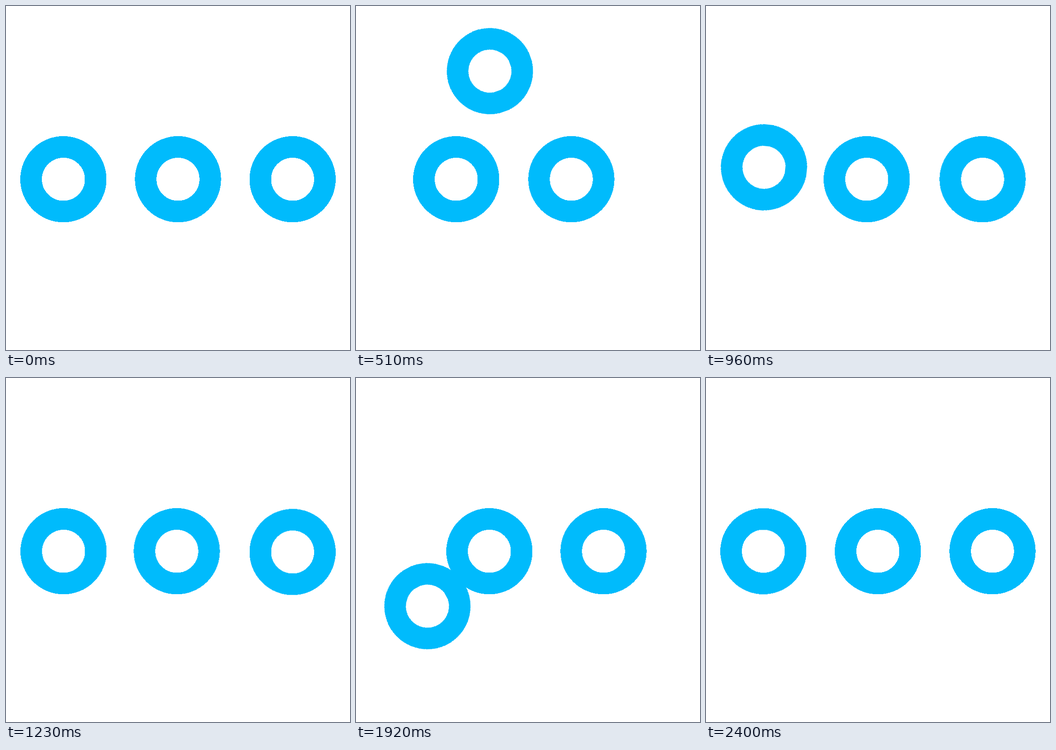
Recreate the animation shown at these times as an HTML page without scripts. Size 748x748 px, loop 2430 ms.

```html
<!DOCTYPE html>
<html lang="en">
<head>
<meta charset="utf-8">
<title>Rolling rings</title>
<style>
  html, body {
    margin: 0;
    width: 100%;
    height: 100%;
    overflow: hidden;
    background: #fff;
  }
  svg {
    display: block;
    width: 748px;
    height: 748px;
  }
  circle {
    fill: none;
    stroke: #00bbfc;
    stroke-width: 47;
    shape-rendering: crispEdges;
    animation: 2430ms infinite;
  }

  /* Two rings slide one place right while the third swings back to the left. */
  .first  { animation-name: slide-first; }
  .second { animation-name: slide-second; }
  .first, .second { animation-timing-function: cubic-bezier(.397, 0, .603, 1); }
  .orbit {
    transform-origin: 374px 376.7px;
    animation-name: swing;
    animation-timing-function: cubic-bezier(.328, 0, .322, 1);
  }

  /* Each pass takes 1200 ms; the roles swap between passes, then a 30 ms rest. */
  @keyframes slide-first {
    0%, 49.3826% { transform: translateX(0); }
    49.382% { transform: translateX(246px); }
    98.7654%, 100% { transform: translateX(249px); }
  }
  @keyframes slide-second {
    0% { transform: translateX(0); }
    49.382% { transform: translateX(249px); }
    49.3826% { transform: translateX(-3px); }
    98.7654%, 100% { transform: translateX(249px); }
  }
  @keyframes swing {
    0%, 49.3826% { transform: rotate(0deg); }
    49.382% { transform: rotate(-180deg); }
    98.7654%, 100% { transform: rotate(180deg); }
  }
</style>
</head>
<body>
<svg viewBox="0 0 748 748">
  <circle class="first" cx="124.8" cy="376.7" r="70.2"/>
  <circle class="second" cx="374" cy="376.7" r="70.2"/>
  <circle class="orbit" cx="623.2" cy="376.7" r="70.2"/>
</svg>
</body>
</html>
```
